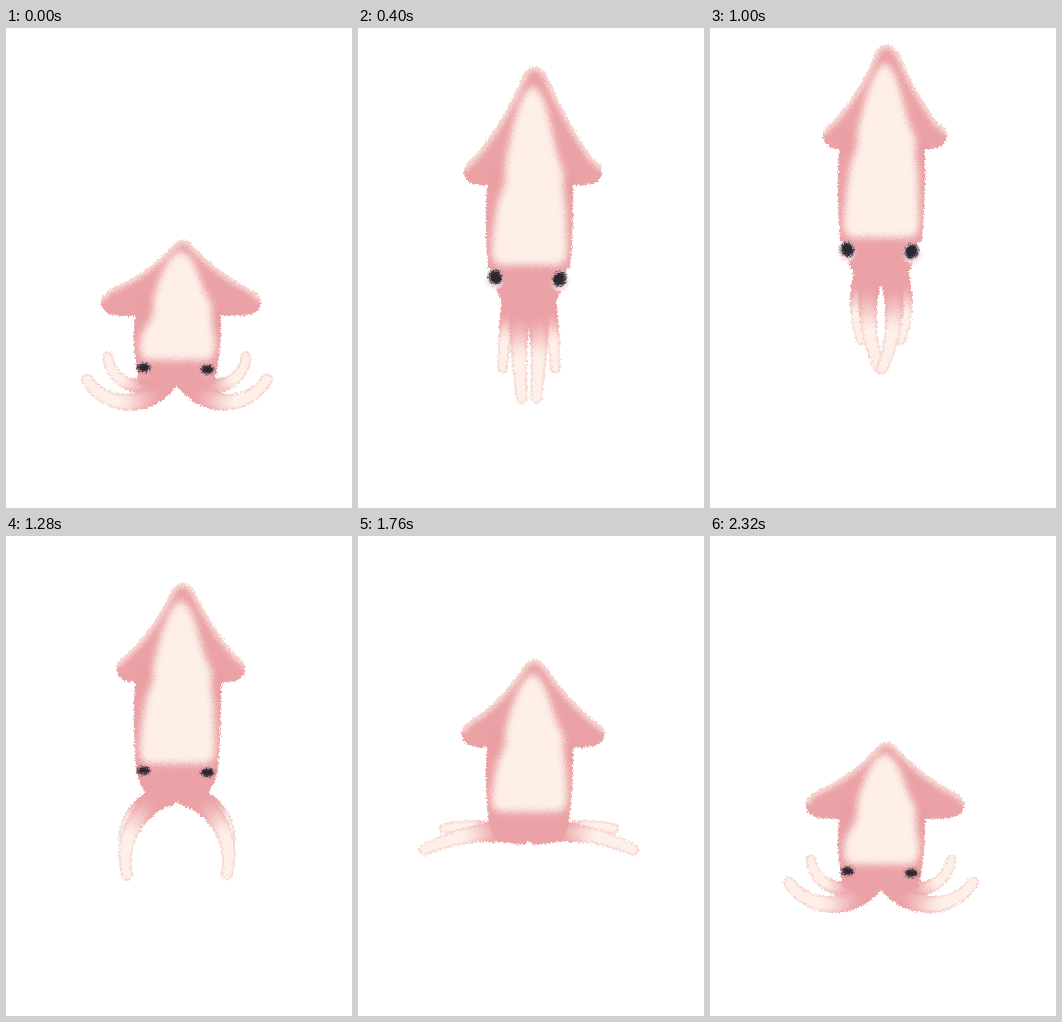
Recreate the animation shown at these times as an HTML page with a canvas. Size 346 by 480 pixels, loop 2.36 s.

```html
<!DOCTYPE html>
<html lang="en">
<head>
<meta charset="utf-8">
<title>Swimming squid</title>
<style>
  html, body { margin: 0; width: 100%; height: 100%; overflow: hidden; background: #fff; }
  canvas { display: block; width: 346px; height: 480px; filter: url(#grain); }
  svg { position: absolute; width: 0; height: 0; }
</style>
</head>
<body>
<canvas id="stage" width="346" height="480"></canvas>
<svg aria-hidden="true">
  <filter id="grain" x="0" y="0" width="100%" height="100%" color-interpolation-filters="sRGB">
    <feTurbulence type="fractalNoise" baseFrequency="0.55" numOctaves="2" seed="7" result="noise"/>
    <feDisplacementMap in="SourceGraphic" in2="noise" scale="5.5" xChannelSelector="R" yChannelSelector="G"/>
  </filter>
</svg>
<script>
const ctx = document.getElementById('stage').getContext('2d');
const LOOP = 2360, STEP = 40, START = 60, SINK = 1000, MID = 171;
const PINK = [235, 162, 166], RIM = [246, 217, 212], CREAM = [254, 240, 232];

// Arms: heading in degrees (0 down, 90 outward), bend along the arm,
// drop of the roots below the belly, and how open the eyes are
const CURLED = { heading: 30, bend: 120, drop: 18, eye: .6 };
const STRAIGHT = { heading: 0, bend: 0, drop: 35, eye: 1 };
const JOINED = { heading: 13, bend: -36, drop: 35, eye: 1 };
const HANGING = { heading: 120, bend: -125, drop: 26, eye: .1 };
const SPREAD = { heading: 75, bend: 46, drop: 17, eye: 0 };
const CYCLE = [
  [START, CURLED], [280, STRAIGHT], [800, JOINED], [1040, JOINED],
  [1520, HANGING], [1960, SPREAD], [LOOP, CURLED]
];

const rgb = c => `rgb(${c.map(Math.round)})`;
const lerp = (a, b, u) => a + (b - a) * u;
const mix = (a, b, u) => a.map((v, i) => lerp(v, b[i], u));
const smooth = (a, b, v) => {
  const u = Math.min(1, Math.max(0, (v - a) / (b - a)));
  return u * u * (3 - 2 * u);
};

function armPose(t) {
  const i = CYCLE.findIndex(key => key[0] >= t);
  if (i === 0) return CURLED;
  const [t0, a] = CYCLE[i - 1], [t1, b] = CYCLE[i], u = (t - t0) / (t1 - t0);
  return Object.fromEntries(Object.keys(a).map(k => [k, lerp(a[k], b[k], u)]));
}

// One jet upward that dies away, then a steady sink; the body stretches with height
function bodyPose(t) {
  const age = Math.max(0, t - START), x = age / 200;
  const s = Math.max(0, t - SINK) / (LOOP - SINK);
  const depth = Math.exp(-age / 158) + s * (1 - Math.exp(-s / .14));
  const lift = 1 - depth, thrust = 1.15 * x * Math.exp(1 - x);
  const top = 15 + 196 * depth;
  return {
    top,
    base: top + 74 + 26 * lift + 20 * thrust,
    end: top + 121 + 71 * lift + 16 * thrust,
    left: 95 + 19 * lift - 6 * thrust
  };
}

function ellipse(x, y, rx, ry, color, blur = 0, turn = 0) {
  ctx.filter = blur ? `blur(${blur}px)` : 'none';
  ctx.fillStyle = color;
  ctx.beginPath();
  ctx.ellipse(x, y, rx, ry, turn, 0, 7);
  ctx.fill();
  ctx.filter = 'none';
}

function arm(side, reach, y0, heading, bend, length, root, tip) {
  const steps = 60;
  for (const [inset, color] of [[0, RIM], [1.8, CREAM]]) {
    let x = MID + side * reach, y = y0;
    for (let i = 0; i <= steps; i++) {
      const u = i / steps, a = (heading + bend * u) * Math.PI / 180;
      const r = lerp(root, tip, Math.pow(u, .75)) - inset;
      ellipse(x, y, r, r, rgb(mix(PINK, color, smooth(.2, .68, u))));
      x += side * Math.sin(a) * length / steps;
      y += Math.cos(a) * length / steps;
    }
  }
}

function drawArms(end, { heading, bend, drop }) {
  const fan = 8 + .12 * (heading + bend), y = end + drop;
  for (const side of [-1, 1]) arm(side, 19, y + 2, heading + fan, bend, 67, 8.5, 5);
  for (const side of [-1, 1]) arm(side, 9, y, heading, bend, 98, 12, 5.8);
}

function finEdge(top, tip, left, right) {
  const mid = (top + tip) / 2;
  ctx.moveTo(left, tip);
  ctx.quadraticCurveTo(left, tip - 6, left + 9, tip - 12);
  ctx.quadraticCurveTo((left + 174) / 2 + 6, mid + 4, 166, top + 7);
  ctx.quadraticCurveTo(177, top - 6, 188, top + 8);
  ctx.quadraticCurveTo((right + 181) / 2 - 3, mid + 5, right - 9, tip - 11);
  ctx.quadraticCurveTo(right, tip - 6, right, tip);
}

function drawBody({ top, base, end, left }) {
  const right = 350 - left, tip = base - 12, tall = end - top, waist = (base + end) / 2;
  ctx.fillStyle = rgb(PINK);
  ctx.beginPath();
  finEdge(top, tip, left, right);
  ctx.bezierCurveTo(right, base + 3, right - 14, base + 3, 215, base + 3);
  ctx.quadraticCurveTo(216, waist, 212, end + 4);
  ctx.lineTo(130, end + 4);
  ctx.quadraticCurveTo(126, waist, 129, base + 3);
  ctx.bezierCurveTo(left + 14, base + 3, left, base + 3, left, tip);
  ctx.fill();

  ctx.globalCompositeOperation = 'source-atop';
  ctx.filter = 'blur(2px)';
  ctx.strokeStyle = 'rgba(251,231,223,.75)';
  ctx.lineWidth = 9;
  ctx.beginPath();
  finEdge(top, tip, left, right);
  ctx.stroke();

  ctx.filter = 'blur(3.5px)';
  ctx.fillStyle = rgb(CREAM);
  ctx.beginPath();
  ctx.moveTo(174, top + tall * .1);
  ctx.bezierCurveTo(192, top + tall * .14, 192, top + tall * .38, 206, base - 8);
  ctx.quadraticCurveTo(207, base + 8, 209, end - 18);
  ctx.quadraticCurveTo(210, end, 198, end);
  ctx.lineTo(145, end);
  ctx.quadraticCurveTo(132, end, 134, end - 18);
  ctx.bezierCurveTo(139, base + 10, 146, base + 8, 146, base - 10);
  ctx.bezierCurveTo(152, top + tall * .38, 158, top + tall * .16, 174, top + tall * .1);
  ctx.fill();
  ellipse(139, base - 3, 8, 14, 'rgba(229,150,155,.45)', 5);
  ellipse(212, base + 6, 5, 16, 'rgba(229,150,155,.5)', 4);
  ctx.globalCompositeOperation = 'source-over';
}

function drawHead(end, { drop, eye }) {
  const low = end + drop + 8, half = 24 + .8 * (35 - drop), inset = 8 * smooth(.6, 1, eye);
  ctx.fillStyle = rgb(PINK);
  ctx.beginPath();
  ctx.moveTo(130, end - 5);
  ctx.lineTo(212, end - 5);
  ctx.bezierCurveTo(213 - inset, end + 10, 208, end + 22, MID + half, low - 2);
  ctx.quadraticCurveTo(MID + half / 2, low + 3, MID, low);
  ctx.quadraticCurveTo(MID - half / 2, low + 3, MID - half, low - 2);
  ctx.bezierCurveTo(134, end + 22, 129 + inset, end + 10, 130, end - 5);
  ctx.fill();
}

function drawEyes(end, { eye }) {
  const open = smooth(.5, 1, eye);
  for (const side of [-1, 1]) {
    const x = 169.5 + side * 32, y = end + 2 + 11 * eye + side;
    ctx.globalAlpha = open;
    ellipse(x + side, y + 2, 9, 10, '#f9e5e2', .8);
    ctx.globalAlpha = smooth(.05, .3, eye);
    ellipse(x, y, 6.6, 7.6 * eye, '#2b2631', 1, side * .5 * open);
  }
  ctx.globalAlpha = 1;
}

function draw(t) {
  ctx.clearRect(0, 0, 346, 480);
  const body = bodyPose(t), pose = armPose(t);
  drawArms(body.end, pose);
  drawHead(body.end, pose);
  drawBody(body);
  drawEyes(body.end, pose);
}

let last = -1;
function tick() {
  const step = Math.floor(performance.now() % LOOP / STEP) * STEP;
  const t = step < 80 ? 0 : step;
  if (t !== last) draw(last = t);
  requestAnimationFrame(tick);
}
tick();
</script>
</body>
</html>
```
